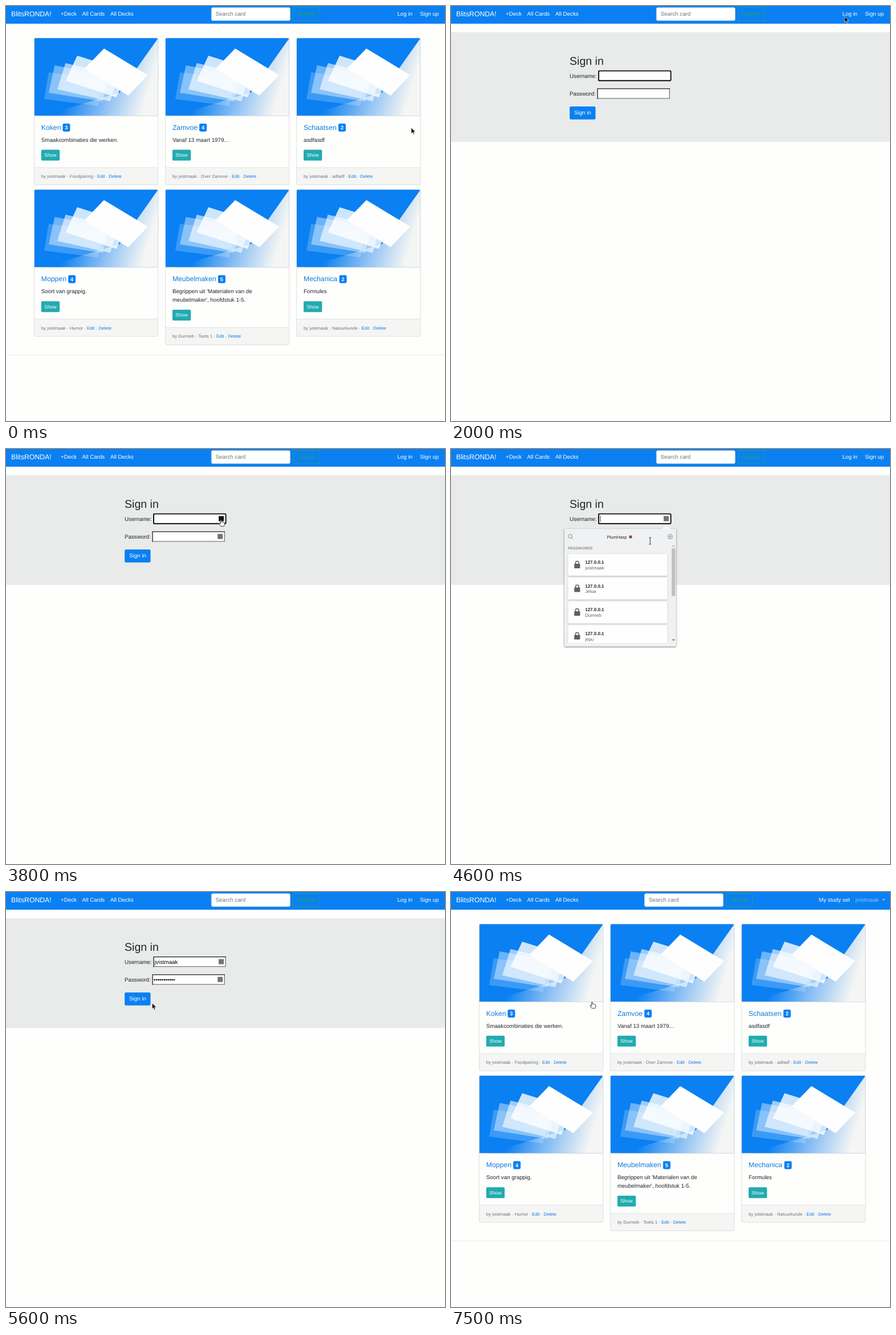
Write an HTML page that moves like this. It is 770 px wide and 727 px high and loops after 8000 ms.

```html
<!DOCTYPE html>
<html lang="en">
<head>
<meta charset="utf-8">
<title>Flash cards</title>
<style>
  html, body { margin: 0; width: 100%; height: 100%; overflow: hidden; background: #fefefd; }
  svg { display: block; width: 770px; height: 727px; }
  text { font-family: "Liberation Sans", Arial, sans-serif; font-size: 9.78px; fill: #212529;
         white-space: pre; text-rendering: geometricPrecision; }
</style>
</head>
<body>
<svg id="stage" viewBox="0 0 770 727" xmlns="http://www.w3.org/2000/svg"></svg>
<script>
const BLUE = '#0a80f2', LINK = '#0f7bdc', GRAY = '#6c757d';
const USER = 'jvistmaak';

const text = (x, y, s, attrs = '') => `<text x="${x}" y="${y}" ${attrs}>${s}</text>`;
const styled = (size, fill, more = '') => `style="font-size:${size}px;fill:${fill};${more}"`;
const rect = (x, y, w, h, fill, attrs = '') =>
  `<rect x="${x}" y="${y}" width="${w}" height="${h}" fill="${fill}" ${attrs}/>`;
const poly = (points, fill, attrs = '') => `<polygon points="${points}" fill="${fill}" ${attrs}/>`;
const group = (id, body, attrs = '') => `<g id="${id}" ${attrs}>${body}</g>`;

// Shared definitions
const coverArt =
  rect(0, 0, 217.3, 136.3, BLUE) +
  poly('217.3,0.5 150,95.5 17,136.3 217.3,136.3', 'url(#sheen)') +
  poly('25.5,60 123,73 112,119 17.5,107', '#fff', 'opacity=".2"') +
  poly('36,48 132,66 120,111 25.5,96', '#fff', 'opacity=".4"') +
  poly('55,44 147,66 133.5,111 40.5,90', '#fff', 'opacity=".6"') +
  poly('75.5,31 165,59 144,104 55,75', '#fff', 'opacity=".8"') +
  poly('122.5,18.5 199.5,65 165,101 88,54', '#fefefe');

const defs = `<defs>
  <linearGradient id="sheen" gradientUnits="userSpaceOnUse" x1="50" y1="114" x2="190" y2="156">
    <stop offset="0" stop-color="${BLUE}"/><stop offset=".5" stop-color="#8cc0f4"/>
    <stop offset=".95" stop-color="#f5f6f4"/>
  </linearGradient>
  <filter id="shadow" x="-10%" y="-10%" width="120%" height="120%">
    <feDropShadow dx="0" dy="1" stdDeviation="1.5" flood-opacity=".55"/>
  </filter>
  <filter id="soft" x="-5%" y="-10%" width="110%" height="130%">
    <feDropShadow dx="0" dy=".7" stdDeviation=".8" flood-opacity=".3"/>
  </filter>
  <clipPath id="listClip">${rect(199, 166, 187, 173.5, '#000')}</clipPath>
  <clipPath id="coverClip">${rect(0, 0, 217.3, 150, '#000', 'rx="2.4"')}</clipPath>
  <g id="cover" clip-path="url(#coverClip)">${coverArt}</g>
</defs>`;

// Home page
const decks = [
  ['Koken', 50, 3, ['Smaakcombinaties die werken.'], USER, 'Foodpairing'],
  ['Zamvoe', 59.6, 4, ['Vanaf 13 maart 1979...'], USER, 'Over Zamvoe'],
  ['Schaatsen', 73.4, 2, ['asdfasdf'], USER, 'adfadf'],
  ['Moppen', 59.7, 4, ['Soort van grappig.'], USER, 'Humor'],
  ['Meubelmaken', 92.4, 5, ["Begrippen uit 'Materialen van de", "meubelmaker', hoofdstuk 1-5."], 'Durmeb', 'Toets 1'],
  ['Mechanica', 75, 2, ['Formules'], USER, 'Natuurkunde'],
];

function card([title, badgeX, count, lines, author, tag], i) {
  const extra = (lines.length - 1) * 14.7;
  const foot = 227 + extra, bottom = 257.3 + extra;
  const link = s => `<tspan fill="${LINK}" style="fill:${LINK}">${s}</tspan>`;
  return `<g transform="translate(${49.4 + i % 3 * 230.1} ${56 + (i > 2 ? 265.4 : 0)})">` +
    rect(0, 0, 217.3, bottom, '#fefefd', 'rx="2.4"') +
    rect(0, foot, 217.3, 30.3, '#f5f6f4', 'rx="1.5"') +
    `<use href="#cover"/>` +
    `<path d="M0 136.4H217.3M0 ${foot}H217.3" stroke="#d9dde0" stroke-width=".8"/>` +
    rect(0, 0, 217.3, bottom, 'none', 'rx="2.4" stroke="#d6d9db" stroke-width=".8"') +
    text(12.4, 160.6, title, styled(12.22, LINK)) +
    rect(badgeX, 150, 13, 14, BLUE, 'rx="2.4"') +
    text(badgeX + 6.5, 160.4, count, styled(9.17, '#fff', 'font-weight:700;text-anchor:middle')) +
    lines.map((s, n) => text(12.4, 182 + n * 14.7, s)).join('') +
    rect(12.4, 195.8 + extra, 32.3, 19, '#22abb0', 'rx="1.9"') +
    text(17.8, 208.3 + extra, 'Show', styled(8.56, '#fff')) +
    text(12.4, 245.4 + extra, `by ${author} · ${tag} · ${link('Edit')} · ${link('Delete')}`, styled(7.82, GRAY)) +
    '</g>';
}
const home = decks.map(card).join('') + rect(0, 610.6, 770, .8, '#e3e4e4');

// Navigation bar
const white = styled(9.78, '#fff');
const nav = rect(0, 0, 770, 31, BLUE) +
  text(9, 18.3, 'BlitsRONDA!', styled(12.22, '#fff')) +
  text(96, 17.4, '+Deck', white) + text(133.6, 17.4, 'All Cards', white) + text(183, 17.4, 'All Decks', white) +
  group('search',
    rect(360.3, 2.8, 138, 22.8, '#fff', 'rx="2.4" stroke="#ced4da" stroke-width=".7"') +
    text(367.6, 17.4, 'Search card', styled(9.78, GRAY)) +
    rect(503.8, 2.8, 46.4, 22.8, 'none', 'rx="2.4" stroke="#28a765" stroke-width=".8"') +
    text(511.3, 17.4, 'Search', styled(9.78, '#28a74f'))) +
  group('guest', text(686.4, 17.4, 'Log in', white) + text(726, 17, 'Sign up', white)) +
  group('member', text(645, 17.4, 'My study set', white) +
    text(709.6, 17.4, USER, styled(9.78, '#8fc3f9')) + poly('756,12.3 762,12.3 759,15.3', '#8fc3f9'));

// Sign-in page
const inset = (x, y) => rect(x, y, 127.6, 18.4, '#fff') +
  `<path d="M${x} ${y + 17.7}H${x + 126.9}V${y}" fill="none" stroke="#777" stroke-width="1.3"/>` +
  `<path d="M${x + .65} ${y + 18.4}V${y + .65}H${x + 127.6}" fill="none" stroke="#1c1c1c" stroke-width="1.3"/>`;

const login = rect(0, 46, 770, 192, '#e8ebea') +
  text(208, 103.4, 'Sign in', styled(19.56, '#212529')) +
  text(208, 125.5, 'Username:') + text(208, 156.7, 'Password:') +
  inset(258.4, 113) + inset(256.4, 144.2) +
  group('focus', rect(259, 113.6, 126.6, 17.2, '#fff', 'rx="2" stroke="#101010" stroke-width="1.9"')) +
  group('caret', rect(261.6, 117, .8, 10.4, '#000')) +
  group('filled', text(260.7, 125.5, USER, styled(9.78, '#000')) +
    text(258.8, 156.8, '•'.repeat(11), styled(9.78, '#000'))) +
  group('icons', rect(373, 117.5, 9, 9, '#737373', 'id="userIcon"') + rect(371.2, 148.7, 9, 9, '#737373')) +
  rect(207.2, 175, 47.2, 24.8, 'none', 'id="ring" rx="3" stroke="#7db9f5" stroke-width="1.9"') +
  rect(208.1, 175.9, 45.4, 22.9, BLUE, 'id="submit" rx="2.4"') +
  text(216, 190.3, 'Sign in', white);

// Password picker
const entry = (name, i) => {
  const y = 184 + i * 41.6;
  return rect(205.5, y, 174, 38, '#fefefe', 'rx="1.2" filter="url(#soft)"') +
    rect(216.2, y + 17, 10.2, 8, '#5a6168', 'rx="1"') +
    `<path d="M218.4 ${y + 17.5}v-2a2.9 2.9 0 0 1 5.8 0v2" fill="none" stroke="#5a6168" stroke-width="1.5"/>` +
    text(235.2, y + 17, '127.0.0.1', styled(8, '#212529', 'font-weight:700')) +
    text(235.2, y + 26.8, name, styled(8, '#5f666c'));
};
const picker =
  `<g filter="url(#shadow)">${rect(199, 140, 195.7, 205.7, '#f0f1f2', 'rx="1.2"')}</g>` +
  poly('369.5,140.5 377.5,132.8 385.5,140.5', '#f6f7f7') +
  '<g fill="none" stroke="#777c80" stroke-width=".9"><circle cx="209" cy="152.8" r="3.3"/>' +
  '<path d="M211.4 155.2l2.8 2.8M384.4 151.6v4M382.4 153.6h4"/><circle cx="384.4" cy="153.6" r="4"/></g>' +
  text(273.5, 156.7, 'PlumHasp', styled(7.6, '#2a2422')) +
  '<circle cx="315" cy="153.9" r="2.6" fill="#8a4a33"/>' +
  text(205.4, 176.4, 'PASSWORDS', styled(6.65, '#8a8f93', 'font-weight:700')) +
  `<g clip-path="url(#listClip)">${[USER, 'Jelua', 'Durmeb', 'jepu'].map(entry).join('')}</g>` +
  rect(386.4, 166, 7.6, 174, '#f1f1f1') + rect(387, 174, 6.5, 83.5, '#c1c1c1') +
  poly('388,171 392.4,171 390.2,168.5', '#a3a3a3') + poly('388,333.4 392.4,333.4 390.2,336', '#505050');

// Pointers, each with its hot spot at 0,0
const pointers =
  group('arrow', poly('0,0 0,10.2 2.4,8 4,11.6 5.7,10.9 4.1,7.4 7.4,7.2', '#111', 'stroke="#fff" stroke-width=".6"')) +
  group('hand', '<path d="M-.9 .9Q0-.6 .9 .9V4.2Q2.2 3.4 2.8 4.4Q4.2 3.8 4.7 4.8Q6.5 4.4 6.5 6V8.6L5.3 11.4H-.3L-3.2 7.4Q-3.6 5.8-2.2 6.1L-.9 7.2Z" fill="#fff" stroke="#111" stroke-width=".8" stroke-linejoin="round"/>') +
  group('beam', '<path d="M-2-6Q0-6 0-5Q0-6 2-6M0-5V5M-2 6Q0 6 0 5Q0 6 2 6" fill="none" stroke="#222" stroke-width=".9"/>');

const stage = document.getElementById('stage');
stage.innerHTML = defs + rect(0, 0, 770, 727, '#fefefd') + group('home', home) + nav +
  group('login', login) + group('picker', picker) + pointers;

const el = id => document.getElementById(id);
const show = (id, on) => el(id).setAttribute('display', on ? 'inline' : 'none');
const between = (t, a, b) => t >= a && t < b;

// time, x, y, pointer shape from that time on
const path = [
  [0, 710.8, 213.3, 'arrow'], [500, 710.8, 213.3, 'arrow'], [800, 728, 140, 'arrow'], [1200, 697, 32, 'arrow'],
  [1300, 689.5, 19, 'hand'], [1500, 689.5, 19, 'hand'], [1600, 690.3, 18.4, 'hand'], [2000, 690.3, 18.4, 'arrow'],
  [2100, 675, 77.5, 'arrow'], [2200, 675, 77.5, 'arrow'], [2800, 386, 147, 'arrow'], [3000, 373, 129, 'hand'],
  [3100, 371.5, 126.3, 'hand'], [3200, 410, 133, 'arrow'], [3400, 489.5, 146, 'arrow'], [3600, 489.5, 146, 'arrow'],
  [3800, 377, 124, 'hand'], [4000, 377, 124, 'hand'], [4200, 358, 148, 'beam'], [4300, 349.3, 161, 'beam'],
  [4600, 349.3, 161, 'beam'], [4700, 335, 180, 'hand'], [4800, 312, 202, 'hand'], [5000, 312, 202, 'arrow'],
  [5200, 458, 180, 'arrow'], [5400, 372, 149, 'arrow'], [5600, 256.3, 194.8, 'arrow'], [5800, 256.3, 194.8, 'arrow'],
  [6000, 249, 193, 'hand'], [6100, 247.4, 192.4, 'hand'], [8000, 247.4, 192.4, 'hand'],
];

function pointerAt(t) {
  const i = path.findIndex(k => k[0] > t) - 1;
  const [t0, x0, y0, shape] = path[i], [t1, x1, y1] = path[i + 1];
  const p = (t - t0) / (t1 - t0);
  return { x: x0 + (x1 - x0) * p, y: y0 + (y1 - y0) * p, shape };
}

function render(ms) {
  const t = Math.floor(ms / 100) * 100;
  const onLogin = between(t, 2000, 7500), member = t >= 7500, filled = t >= 5000;
  show('home', !onLogin);
  show('login', onLogin);
  show('guest', !member);
  show('member', member);
  el('search').setAttribute('transform', `translate(${member ? -20.9 : 0} 0)`);

  show('icons', t >= 2300);
  show('focus', !filled);
  show('caret', !filled && Math.floor((t - 2200) / 500) % 2 === 0);
  show('filled', filled);
  show('picker', between(t, 4600, 5000));
  const hover = between(t, 3000, 3200) || between(t, 3800, 4100);
  el('userIcon').setAttribute('fill', hover ? '#111' : '#737373');
  el('submit').setAttribute('fill', t >= 6000 ? '#0a6dd0' : BLUE);
  el('ring').setAttribute('opacity', Math.max(0, Math.min(1, (t - 6400) / 300)));

  const { x, y, shape } = pointerAt(t);
  for (const id of ['arrow', 'hand', 'beam']) show(id, id === shape);
  el(shape).setAttribute('transform', `translate(${x} ${y})`);
}

function tick() {
  render(performance.now() % 8000);
  requestAnimationFrame(tick);
}
tick();
</script>
</body>
</html>
```
